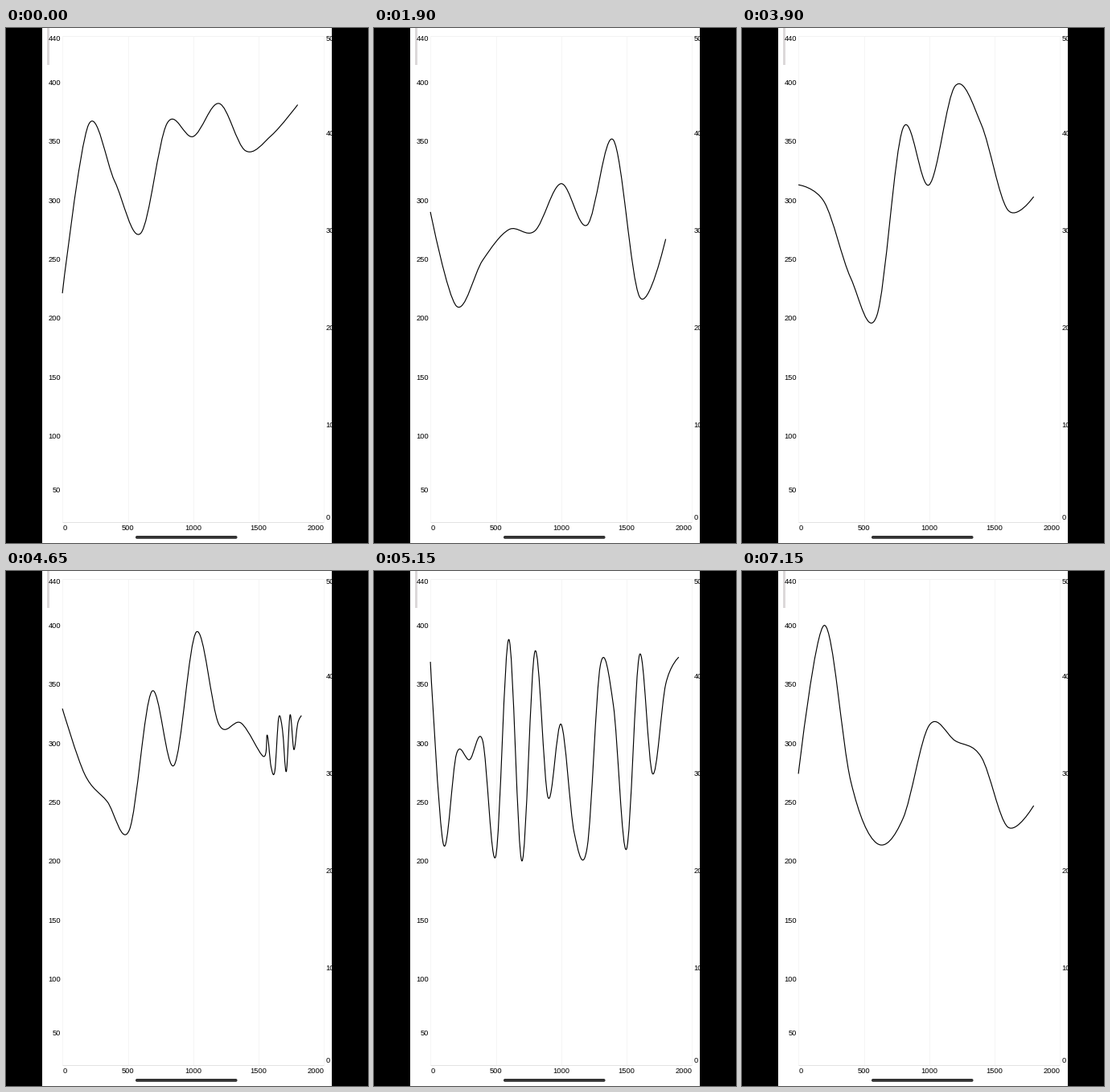
A matplotlib script that plays this animation: 450 px wide and 641 px high, repeating every 8000 ms.

```python
import matplotlib.pyplot as plt
import numpy as np
from matplotlib.animation import FuncAnimation
from matplotlib.patches import FancyBboxPatch, PathPatch, Rectangle
from matplotlib.path import Path

W, H, DPI = 450, 641, 100
STEP, LOOP = 50, 8000
DURATION = 500
PX = 72 / DPI          # one pixel in points
TOP, BOTTOM = 9.5, 614.5


def x_pos(v):
    return 70.1 + 0.1625 * v


def y_pos(v):
    return 67.6 + (400 - v) * 22 / 15


def y2_pos(v):
    return BOTTOM - 12.1 * v


# start of the move in ms, spacing along x, key values of the curve
CURVES = [
    (0, 200, [221, 364, 316, 272, 365, 354, 382, 342, 355, 381]),
    (1050, 200, [290, 210, 249, 275, 274, 314, 279, 351, 218, 267]),
    (2555, 200, [313, 298, 234, 202, 361, 313, 397, 364, 292, 303]),
    (4463, 100, [369, 214, 291, 286, 302, 204, 388, 200, 378, 254,
                 316, 224, 212, 366, 332, 210, 375, 274, 350, 373]),
    (6600, 200, [274, 400, 268, 215, 236, 315, 302, 288, 229, 247]),
]


def key_points(gap, values):
    x = x_pos(gap * np.arange(len(values)))
    return np.column_stack([x, y_pos(np.array(values))])


def ease(t):
    """Cubic ease-in-out with handles (0.42, 0) and (0.58, 1)."""
    s = np.linspace(0, 1, 201)
    x = 3 * s * (1 - s) ** 2 * 0.42 + 3 * s**2 * (1 - s) * 0.58 + s**3
    return np.interp(t, x, s * s * (3 - 2 * s))


def points_at(ms):
    k = max(i for i, curve in enumerate(CURVES) if ms >= curve[0])
    start, *shape = CURVES[k]
    new = key_points(*shape)
    old = key_points(*CURVES[max(k - 1, 0)][1:])
    # added points grow out of the last one, surplus points drop at once
    extra = max(0, len(new) - len(old))
    old = np.vstack([old, np.repeat(old[-1:], extra, axis=0)])[:len(new)]
    return old + (new - old) * ease(min(1, (ms - start) / DURATION)) if k else new


def spline(pts):
    """Catmull-Rom curve as Bezier segments with flat end handles."""
    handle = np.zeros_like(pts)
    handle[1:-1] = (pts[2:] - pts[:-2]) / 6
    verts = [pts[0]]
    for i in range(len(pts) - 1):
        verts += [pts[i] + handle[i], pts[i + 1] - handle[i + 1], pts[i + 1]]
    return Path(verts, [Path.MOVETO] + [Path.CURVE4] * (len(verts) - 1))


fig = plt.figure(figsize=(W / DPI, H / DPI), dpi=DPI, facecolor="white")
ax = fig.add_axes([0, 0, 1, 1])
ax.set_xlim(0, W)
ax.set_ylim(H, 0)
ax.axis("off")


def label(x, y, value, ha):
    ax.text(x, y, str(value), ha=ha, va="center_baseline", color="black",
            family="Liberation Sans", size=9.4 * PX, zorder=3)


def rule(xs, ys, color):
    ax.plot(xs, ys, color=color, lw=PX, zorder=1, solid_capstyle="butt")


# grid and axis labels; labels at the ends are pushed inside the plot
for v in range(0, 2001, 500):
    x = x_pos(v) + 0.3
    rule([x, x], [TOP, BOTTOM], "#f5f5f5")
    label(np.clip(x, 73, 385.3), 621.5, v, "center")
for y, color in [(TOP, "#f2f2f2"), (BOTTOM, "#e2e2e2")]:
    rule([x_pos(0), x_pos(2000)], [y, y], color)
for v in [440, *range(400, 0, -50)]:
    label(68.3, np.clip(y_pos(v), 12.5, 574.5), v, "right")
for v in range(0, 51, 10):
    label(397.6, np.clip(y2_pos(v), 12.5, 608.5), v, "left")

# scroll bar, home bar and side bars
ax.add_patch(Rectangle((51, 0), 3, 45.5, color="#dcd8d9", lw=0, zorder=2))
ax.add_patch(FancyBboxPatch((162.8, 633.8), 122.9, 0.2, fc="#333333", lw=0, zorder=2,
                            boxstyle="round,pad=1.8,rounding_size=1.8"))
for x in (0, 405):
    ax.add_patch(Rectangle((x, 0), 45, H, color="black", lw=0, zorder=5))

line = PathPatch(spline(points_at(0)), fc="none", ec="black", lw=1.15 * PX,
                 capstyle="butt", joinstyle="round", zorder=4)
ax.add_patch(line)


def draw(i):
    line.set_path(spline(points_at(i * STEP)))
    return [line]


anim = FuncAnimation(fig, draw, frames=LOOP // STEP, interval=STEP,
                     repeat=True, repeat_delay=0)
plt.show()
```
